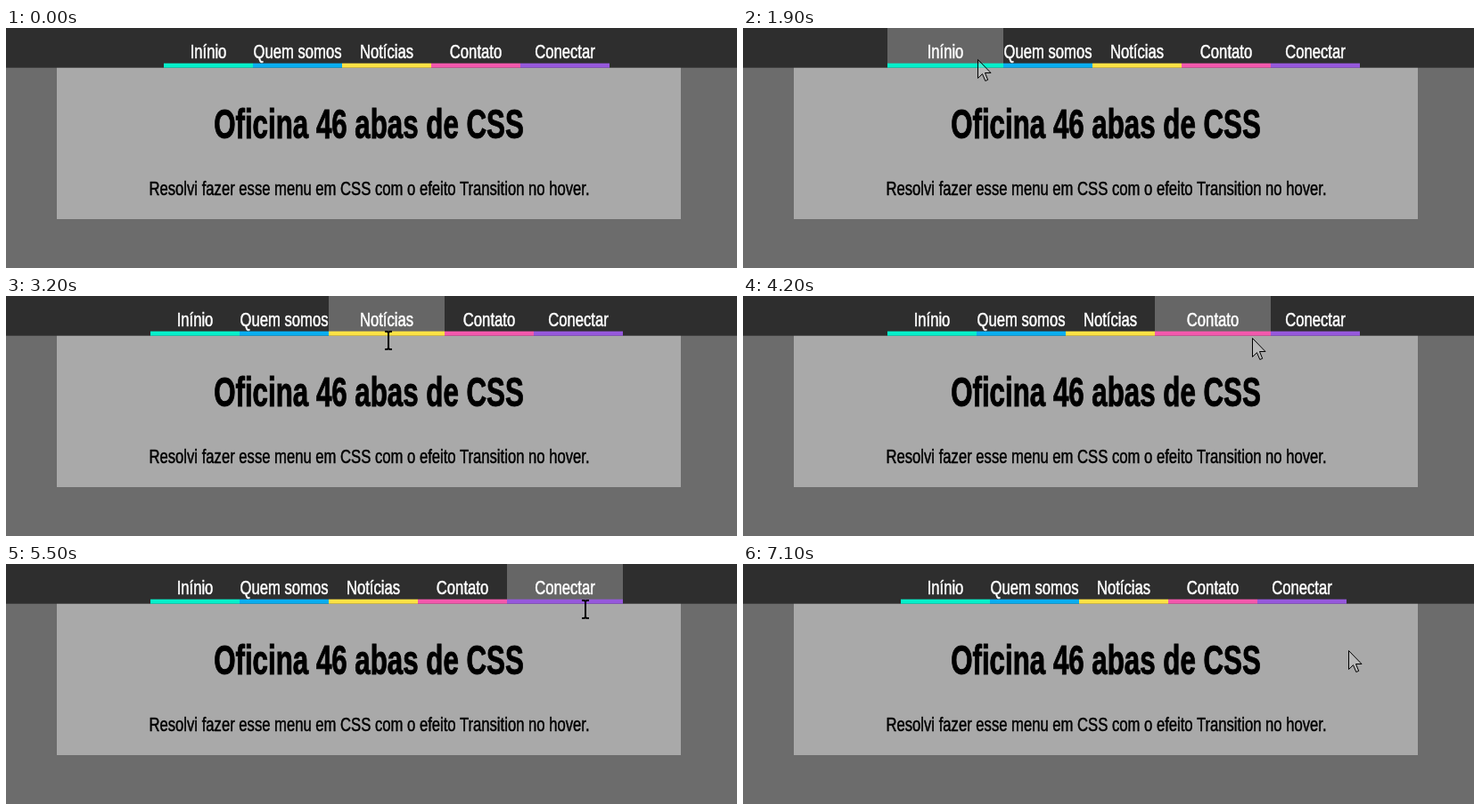
Animation, 820 px wide and 270 px high, one loop 7200 ms. Source, as an HTML page:

```html
<!DOCTYPE html>
<html lang="pt-BR">
<head>
<meta charset="utf-8">
<title>Menu</title>
<style>
  html, body { margin: 0; width: 100%; height: 100%; overflow: hidden; background: #6c6c6c; }
  svg { display: block; }
  text { font: 22px "Liberation Sans", Arial, sans-serif; text-anchor: middle; stroke-width: .5px; }
  #menu text { fill: #fff; stroke: #fff; stroke-width: .6px; }
  .copy { stroke: #000; }
  #title { font-size: 46px; font-weight: 700; stroke-width: 1px; }
</style>
</head>
<body>
<svg width="820" height="270" viewBox="0 0 820 270">
  <rect width="820" height="270" fill="#6c6c6c"/>
  <rect x="57" y="44" width="700" height="171" fill="#a9a9a9"/>
  <rect width="820" height="44.7" fill="#2e2e2e"/>
  <g id="menu"></g>
  <text class="copy" id="title" transform="translate(407 124) scale(.68 1)">Oficina 46 abas de CSS</text>
  <text class="copy" transform="translate(407.5 188) scale(.757 1)">Resolvi fazer esse menu em CSS com o efeito Transition no hover.</text>
  <path id="arrow" d="M0 .5V21.5L5 16.7 8.3 24.5 11.2 23.3 8 15.5H14.5Z" fill="#fff" fill-opacity=".2" stroke="#000"/>
  <path id="beam" d="M-4-10H-2Q0-10 0-8Q0-10 2-10H4M0-8V8M-4 10H-2Q0 10 0 8Q0 10 2 10H4" fill="none" stroke="#000" stroke-width="2"/>
</svg>
<script>
const LOOP = 7200, STEP = 100, FADE = 350, CENTER = 427;

// label, bar colour, half width of the label, time the pointer enters
const items = [
  ["Inínio", "#06f0ca", 21, 1350],
  ["Quem somos", "#0aaef0", 48, 2100],
  ["Notícias", "#fde245", 31, 2750],
  ["Contato", "#f359ad", 30, 3600],
  ["Conectar", "#9659dc", 34, 4450],
].map(([label, color, half, enter]) => ({ label, color, half, enter }));
items.forEach((item, i) => item.leave = i < 4 ? items[i + 1].enter : 5550);

// pointer path: time, x, y
const path = [
  [100, 110, 275], [800, 138, 120], [1300, 176.5, 31.5], [1700, 235, 34],
  [2100, 292, 36], [2500, 351, 38], [2800, 400, 46], [3200, 429, 50],
  [3700, 510, 48], [4200, 571.5, 47], [4700, 650, 51], [5500, 650, 51],
  [6000, 679.5, 92], [6300, 679.5, 92], [6800, 679.5, 97], [LOOP, 679.5, 97],
];

const menu = document.getElementById("menu");
const arrow = document.getElementById("arrow");
const beam = document.getElementById("beam");

function add(tag, attrs) {
  const node = document.createElementNS(menu.namespaceURI, tag);
  set(node, attrs);
  return menu.appendChild(node);
}

function set(node, attrs) {
  for (const key in attrs) node.setAttribute(key, attrs[key]);
}

for (const item of items) {
  item.back = add("rect", { height: 44, fill: "#666" });
  item.bar = add("rect", { y: 39.7, height: 5, fill: item.color });
  item.text = add("text", {});
  item.text.textContent = item.label;
}

function ease(p) {
  p = Math.min(1, Math.max(0, p));
  return 1 - (1 - p) ** 2 * (1 + 2 * p);
}

function pointerAt(t) {
  if (t <= path[0][0]) return path[0].slice(1);
  const i = path.findIndex(k => k[0] >= t);
  const [t0, x0, y0] = path[i - 1], [t1, x1, y1] = path[i];
  const p = (t - t0) / (t1 - t0);
  return [x0 + (x1 - x0) * p, y0 + (y1 - y0) * p];
}

function draw(t) {
  const open = items.map(it => ease((t - it.enter) / FADE) - ease((t - it.leave) / FADE));
  const widths = open.map(o => 100 + 30 * o);
  const [px, py] = pointerAt(t);
  let x = CENTER - widths.reduce((a, b) => a + b) / 2;
  let overText = false;

  items.forEach((item, i) => {
    const width = widths[i], mid = x + width / 2;
    set(item.back, { x, width, opacity: open[i] });
    set(item.bar, { x, width });
    set(item.text, { transform: `translate(${mid} 33.5) scale(.757 1)` });
    if (py > 31 && py < 55 && Math.abs(px - mid) < item.half) overText = true;
    x += width;
  });

  const place = `translate(${px} ${py})`;
  set(arrow, { transform: place, visibility: overText ? "hidden" : "visible" });
  set(beam, { transform: place, visibility: overText ? "visible" : "hidden" });
}

const start = performance.now();
function tick() {
  const t = (performance.now() - start) % LOOP;
  draw(Math.floor(t / STEP) * STEP);
  requestAnimationFrame(tick);
}
tick();
</script>
</body>
</html>
```
